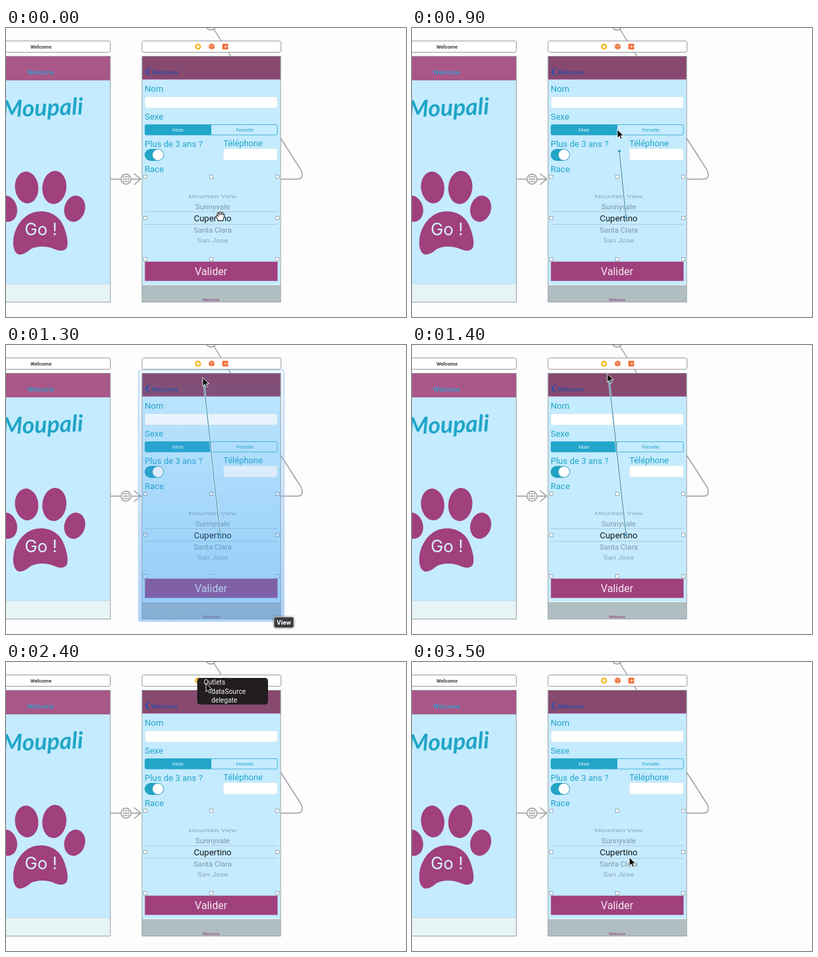
An HTML page that plays this animation: 600x435 px, repeating every 3.6 s.

```html
<!DOCTYPE html>
<html lang="fr">
<head>
<meta charset="utf-8">
<title>Storyboard</title>
<style>
html, body { margin: 0; width: 100%; height: 100%; overflow: hidden; background: #fdfdfe; }
svg { display: block; width: 100vw; height: 100vh; }
text { font-family: Roboto, Inter, sans-serif; }
.mid { text-anchor: middle; }
.label { font-size: 13px; fill: #1fa5c9; }
.wire { fill: none; stroke: #98989c; stroke-width: 1.4; }
.dock { fill: #fff; stroke: #9a9a9e; stroke-width: 1; }
.edge { fill: none; stroke: #9aa3a8; stroke-width: 1; }
.sky { fill: #c5ebff; }
.plum { fill: #a0407c; }
.field { fill: #fff; stroke: #d3e6ee; stroke-width: .8; }
.city { font-size: 11.2px; fill: #7f97a3; }
.handle { fill: #fff; stroke: #8c9ca5; stroke-width: .8; }
.tip { filter: drop-shadow(0 0 1px #0009); }
.tip rect { fill: #3b3b3f; stroke: #f4f6f8; stroke-width: .8; }
.tip text { font-size: 9.9px; font-weight: 700; fill: #fff; text-anchor: middle; }
.glow { fill: url(#tint); stroke: #9fcbee; stroke-width: 1.2; }
.menu text { font-size: 10.2px; fill: #f4f2f4; }
.dot { fill: #2f93bf; stroke: #d9f0fb; stroke-width: .5; }
</style>
</head>
<body>
<svg viewBox="0 0 600 435" preserveAspectRatio="none">
  <defs>
    <linearGradient id="tint" x2="0" y2="1">
      <stop offset="0" stop-color="#469beb" stop-opacity=".05"/>
      <stop offset="1" stop-color="#469bf0" stop-opacity=".41"/>
    </linearGradient>
  </defs>

  <!-- connections -->
  <g class="wire">
    <circle cx="307.500" cy="-5" r="8"/>
    <path d="M312 2L337.500 43M412 166L442.500 213.500Q448 227.500 437 227.500H412"/>
    <path d="M157 227.500H172M188 227.500H202M192 219L202 227.500L192 236"/>
    <circle cx="180" cy="227.500" r="7.500" fill="#fdfdfe"/>
    <path d="M176 223.500h8v8h-8zM180 224v7M176.500 227.500h7" stroke-width=".9"/>
  </g>

  <!-- left scene -->
  <rect class="dock" x="-20" y="19.500" width="176.500" height="17" rx="2.500"/>
  <text class="mid" x="52.500" y="31" font-size="7.600" font-weight="700" fill="#3c3c40">Welcome</text>
  <rect class="sky" x="-5" y="42" width="161.500" height="370"/>
  <rect x="-5" y="42" width="161.500" height="36.500" fill="#a95788"/>
  <path d="M0 78H156" stroke="#8f4d7c" stroke-width=".8"/>
  <rect x="-5" y="385" width="161.500" height="27" fill="#e6f4f5"/>
  <path d="M0 385H156" stroke="#b5cfd8" stroke-width=".7"/>
  <rect class="edge" x="-5" y="42.500" width="161.500" height="370"/>
  <text class="mid" x="52" y="69.500" font-size="9.600" font-weight="500" fill="#2a9fcb">Welcome</text>
  <text x="116" y="130" text-anchor="end" transform="rotate(-2 116 130)" fill="#1fa5c7"
    style="font:italic 700 35px Lato,sans-serif">Moupali</text>
  <g class="plum">
    <ellipse cx="31" cy="240" rx="17.500" ry="24" transform="rotate(-6 31 240)"/>
    <ellipse cx="72.500" cy="240" rx="18" ry="25" transform="rotate(6 72.500 240)"/>
    <ellipse cx="1" cy="272" rx="15.500" ry="20" transform="rotate(-15 1 272)"/>
    <ellipse cx="103" cy="272" rx="15.500" ry="20" transform="rotate(15 103 272)"/>
    <path d="M52 276C70 276 82 286 87 300C91 311 94 322 91.500 330C88 337 79 336 71 332C60 327.500 44 328 36 333.500C30 339 22 343 17 340C10 335 10 322 12 312C17 292 32 276 52 276Z"/>
  </g>
  <text class="mid" x="52.500" y="312" fill="#d9f1fd" style="font:400 25.500px Inter,sans-serif">Go !</text>

  <!-- right scene -->
  <rect class="dock" x="204" y="19.500" width="208.500" height="17" rx="2.500"/>
  <rect id="pick" x="281.500" y="21.500" width="13.500" height="13" rx="2" fill="#3b7ec2"/>
  <circle cx="288" cy="28" r="4.600" fill="#f6b82d"/>
  <rect x="286" y="26" width="4" height="4" rx=".6" fill="#fff3d0"/>
  <path d="M308.500 23.300l4.200 2.100v5l-4.200 2.200l-4.200-2.200v-5z" fill="#f0733c"/>
  <path d="M304.600 25.600l3.900 2l3.900-2M308.500 27.600v4.700" fill="none" stroke="#fbd3bd" stroke-width=".7"/>
  <rect x="324.500" y="23.800" width="8.800" height="8.400" rx="1" fill="#ef6c35"/>
  <path d="M333.500 28H328M330 26l-2.200 2l2.200 2" fill="none" stroke="#fff" stroke-width=".8"/>

  <rect x="204" y="42" width="208" height="370" fill="#b0bec1"/>
  <path class="sky" d="M204 77H412V384Q412 387 409 387H207Q204 387 204 384Z"/>
  <path d="M205 386.500H411" stroke="#f2fbff" stroke-width="1"/>
  <rect x="204" y="42" width="208" height="35" fill="#87496f"/>
  <path d="M204 77H412" stroke="#9b3f7b" stroke-width="1.200"/>
  <rect class="edge" x="204" y="42.500" width="208" height="370"/>
  <path d="M215 60.500L209.500 66L215 71.500" fill="none" stroke="#1d50b8" stroke-width="1.800"/>
  <text x="218" y="69.500" font-size="9.600" font-weight="500" fill="#2b4fa3">Welcome</text>
  <text class="mid" x="307.500" y="410.500" font-size="6" fill="#8d2f70">Welcome</text>

  <g class="label">
    <text x="208" y="95.500">Nom</text>
    <text x="208" y="137.500">Sexe</text>
    <text x="208" y="178.500">Plus de 3 ans ?</text>
    <text x="326" y="178" font-size="12.800">Téléphone</text>
    <text x="208" y="216.500">Race</text>
  </g>
  <rect class="field" x="208.500" y="103.500" width="198.500" height="17" rx="3"/>
  <rect class="field" x="326" y="181.500" width="81" height="17.500" rx="3"/>
  <rect x="208.500" y="145.500" width="198.500" height="15.500" rx="2" fill="none" stroke="#24a6cb" stroke-width=".8"/>
  <path d="M308 145.500V161H210.500Q208.500 161 208.500 159V147.500Q208.500 145.500 210.500 145.500Z" fill="#22a6ca"/>
  <text class="mid" x="258" y="156" font-size="7.600" fill="#d5f1fc">Male</text>
  <text class="mid" x="358" y="156" font-size="7.500" fill="#22a6ca">Femelle</text>
  <rect x="208" y="182" width="29" height="18" rx="9" fill="#22a3c5"/>
  <circle cx="228" cy="191" r="8.200" fill="#fff" stroke="#86b4c4" stroke-width=".6"/>

  <path d="M208 276.500H407M208 295.500H407" stroke="#a9c9d6" stroke-width=".9"/>
  <g class="mid">
    <g class="city">
      <text transform="translate(310 256) scale(1 .74)" font-size="10.900" fill="#8ba6b3">Mountain View</text>
      <text transform="translate(310 272.500) scale(1 .95)" font-size="11.500">Sunnyvale</text>
      <text transform="translate(310 307.800) scale(1 .95)">Santa Clara</text>
      <text transform="translate(310 322.700) scale(1 .74)" fill="#8ba6b3">San Jose</text>
    </g>
    <text x="310" y="291" font-size="13" fill="#10181c">Cupertino</text>
  </g>
  <rect class="plum" x="208.400" y="351.700" width="199" height="29"/>
  <text class="mid" x="307.500" y="372" font-size="15.800" fill="#f3e9f2">Valider</text>
  <g id="handles"></g>

  <!-- drop targets -->
  <g id="picker">
    <rect class="glow" x="204" y="218.500" width="208" height="134.500" rx="2"/>
    <g class="tip"><rect x="381.500" y="345.300" width="62" height="16" rx="3"/><text x="412.200" y="356.700">Picker View</text></g>
  </g>
  <g id="view">
    <rect class="glow" x="199" y="38" width="218" height="378" rx="3"/>
    <g class="tip"><rect x="401.800" y="409.300" width="30" height="16.500" rx="3"/><text x="416.800" y="421">View</text></g>
  </g>

  <g id="drag">
    <path id="halo" stroke="#e4f6ff" stroke-width="2.800" opacity=".8"/>
    <path id="line" stroke="#4590ac" stroke-width="1.200"/>
    <circle class="dot" cx="321" cy="285.500" r="2.200"/>
    <circle class="dot" id="end" r="2.200"/>
  </g>

  <g id="menu" class="menu">
    <rect x="286.800" y="24" width="106.200" height="40" rx="4.500" fill="#211d20"/>
    <text x="296.500" y="34.300">Outlets</text>
    <text x="308" y="47.600">dataSource</text>
    <text x="308" y="60.800">delegate</text>
  </g>

  <g id="hand" transform="translate(321.500 283)" fill="#fff" stroke="#111" stroke-width="1" stroke-linejoin="round">
    <path d="M-3 7L-5.500 2.500Q-7.500 -.5 -5.500 -1Q-4.500 -1 -3.300 .7L-4.700 -3.800Q-4.600 -5.800 -2.700 -4.800L-1.500 -1.500L-1.800 -5.600Q-.5 -7.600 .7 -5.600L1 -1.700L2 -5.200Q3.600 -6.600 4.200 -4.500L3.700 -1L4.800 -3Q6.700 -3.700 6.400 -1.600L4.800 4L4 7Z"/>
  </g>
  <path id="arrow" d="M0 0V13L3 10.200L5 14.700L7.200 13.700L5.200 9.400H9.400Z" fill="#0a0a0a" stroke="#fff" stroke-width=".9" stroke-linejoin="round"/>
</svg>
<script>
const LOOP = 3600, STEP = 100;
const $ = id => document.getElementById(id);
const show = (id, on) => { $(id).style.display = on ? '' : 'none'; };

// pointer path: time, x, y
const path = [
  [0, 321, 283], [400, 321, 283], [600, 315, 233], [700, 314, 218],
  [1000, 305, 120], [1100, 302, 90], [1200, 296.5, 54], [1300, 295, 49],
  [1600, 288.5, 31], [1700, 288, 29], [2100, 288, 29], [2400, 300, 32],
  [2700, 318, 44], [2900, 318, 44], [3300, 326, 290], [3500, 326, 294]
];

function pointer(t) {
  const i = path.findIndex(p => p[0] > t);
  if (i < 0) return path[path.length - 1].slice(1);
  const [a, b] = [path[i - 1], path[i]];
  const k = (t - a[0]) / (b[0] - a[0]);
  return [a[1] + (b[1] - a[1]) * k, a[2] + (b[2] - a[2]) * k];
}

for (const y of [224, 286, 348])
  for (const x of [209, 308, 407])
    if (x !== 308 || y !== 286)
      $('handles').insertAdjacentHTML('beforeend',
        `<rect class="handle" x="${x - 2.5}" y="${y - 2.5}" width="5" height="5"/>`);

function draw(now) {
  const t = Math.floor(now % LOOP / STEP) * STEP;
  const within = (a, b) => t >= a && t < b;
  const [x, y] = pointer(t);

  show('hand', t < 400);
  show('arrow', t >= 400);
  $('arrow').setAttribute('transform', `translate(${x} ${y})`);

  // the rubber line trails the pointer by one step
  const [ex, ey] = pointer(Math.max(0, t - STEP));
  const d = `M321 285.5L${ex} ${ey}`;
  $('line').setAttribute('d', d);
  $('halo').setAttribute('d', d);
  $('end').setAttribute('cx', ex);
  $('end').setAttribute('cy', ey);

  show('drag', within(500, 2000));
  show('picker', within(500, 800));
  show('view', within(1200, 1400));
  show('pick', within(1600, 2000));
  show('menu', within(2000, 3000));
}

const start = performance.now();
function tick() {
  draw(performance.now() - start);
  requestAnimationFrame(tick);
}
tick();
</script>
</body>
</html>
```
